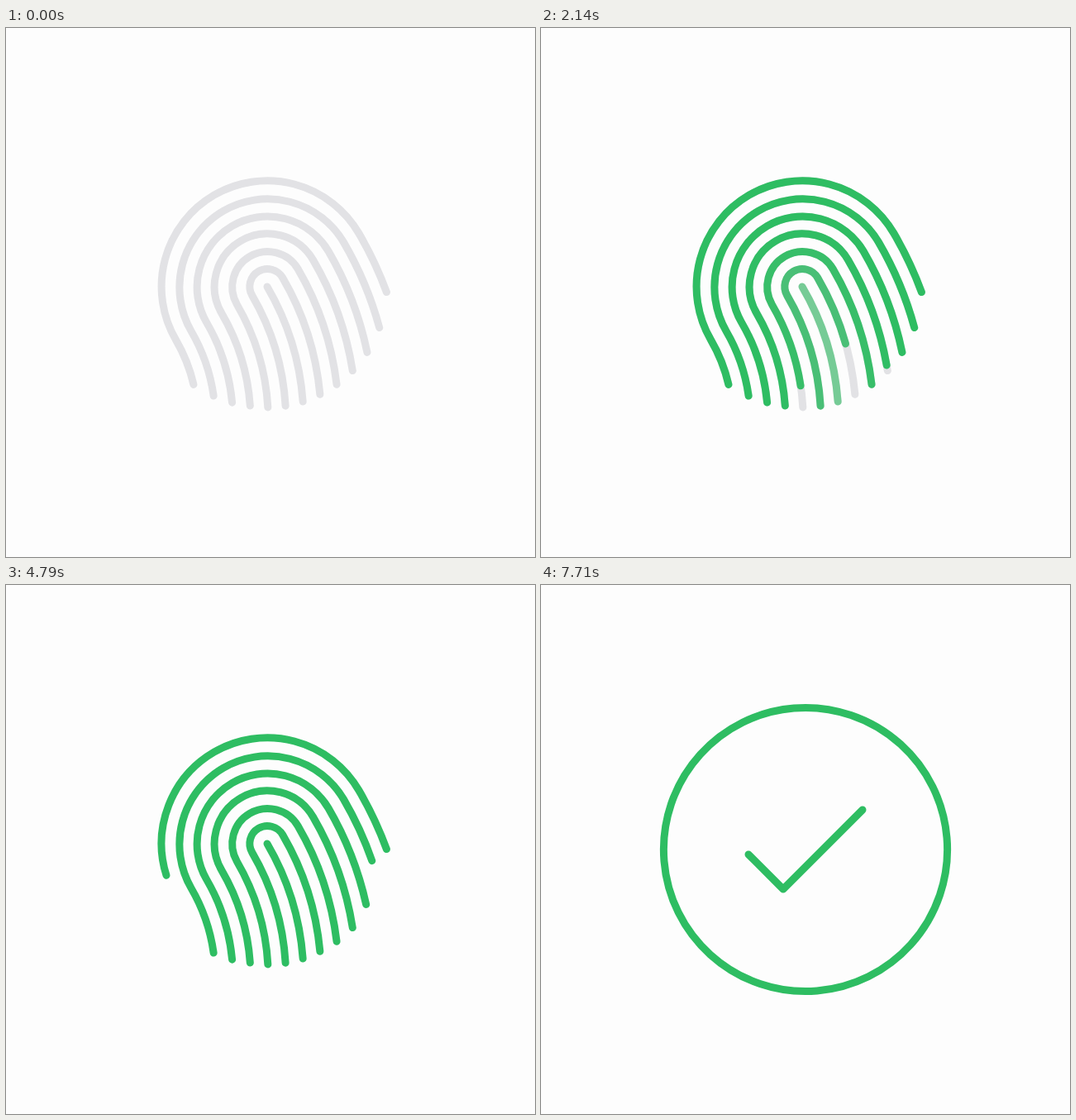
Recreate the animation shown at these times as an HTML page. Size 640 px wide and 640 px high, loop 8.43 s.

```html
<!DOCTYPE html>
<html lang="en">
<head>
<meta charset="utf-8">
<title>Fingerprint to check mark</title>
<style>
  html, body { margin: 0; width: 100%; height: 100%; overflow: hidden; background: #fdfdfd; }
  svg { display: block; width: 100%; height: 100%; }
  path { fill: none; stroke-width: 9; stroke-linecap: round; stroke-linejoin: round; }
</style>
</head>
<body>
<svg viewBox="0 0 640 640">
  <g id="base" stroke="#e2e2e5"></g>
  <g id="ink" stroke="rgb(46 189 98)"></g>
</svg>
<script>
const LOOP = 8430, MOVE = 1760, STAGGER = 200;
const ERASE_AT = 4190, BASE_OFF = 3490, RING_AT = 5030, CHECK_AT = 5740;
const GRAY = [200, 200, 210], GREEN = [46, 189, 98];

// Every ridge is a half circle around CORE, joined to arcs around PIVOT.
const CORE = [316, 313], PIVOT = [38, 475], REACH = 322, GAP = 21.35;
const AXIS = -30.23;

// End angles around PIVOT, outermost ridge first.
const RIDGES = [
  { left: -13.0, right: -20.2, from: 'left' },
  { left: -8.0, right: -15.2, from: 'right' },
  { left: -5.3, right: -11.7, from: 'right' },
  { left: -4.0, right: -9.0, from: 'left' },
  { left: -3.3, right: -6.9, from: 'right' },
  { left: -3.4, right: -5.3, from: 'left' }
];

const polar = ([cx, cy], r, deg) => {
  const a = deg * Math.PI / 180;
  return `${(cx + r * Math.cos(a)).toFixed(2)} ${(cy + r * Math.sin(a)).toFixed(2)}`;
};
const arc = (r, sweep, end) => `A${r} ${r} 0 0 ${sweep} ${end}`;
const mix = (from, to, p) => `rgb(${from.map((v, i) => Math.round(v + (to[i] - v) * p)).join(' ')})`;

function ridgePath({ left, right, from }, i) {
  const r = GAP * (RIDGES.length - i), inner = REACH - r, outer = REACH + r;
  const a = polar(PIVOT, inner, left), b = polar(PIVOT, inner, AXIS);
  const c = polar(PIVOT, outer, AXIS), d = polar(PIVOT, outer, right);
  return from === 'left'
    ? `M${a}${arc(inner, 0, b)}${arc(r, 1, c)}${arc(outer, 1, d)}`
    : `M${d}${arc(outer, 0, c)}${arc(r, 0, b)}${arc(inner, 1, a)}`;
}

function addPath(groupId, d) {
  const path = document.createElementNS('http://www.w3.org/2000/svg', 'path');
  path.setAttribute('d', d);
  path.setAttribute('pathLength', 1);
  return document.getElementById(groupId).appendChild(path);
}

const corePath = `M${CORE.join(' ')}${arc(REACH, 1, polar(PIVOT, REACH, -4.1))}`;
const ridgePaths = RIDGES.map(ridgePath);
[...ridgePaths, corePath].forEach(d => addPath('base', d));

const ridges = ridgePaths.map(d => addPath('ink', d));
const core = addPath('ink', corePath);
const ringPoint = deg => polar([320, 320], 171.6, deg);
const ring = addPath('ink', `M${ringPoint(-26.3)}${arc(171.6, 1, ringPoint(153.7))}${arc(171.6, 1, ringPoint(333.7))}`);
const check = addPath('ink', 'M251 326L293 368L389 272');
const base = document.getElementById('base');

// Symmetric cubic Bézier ease, solved by bisection.
function ease(x) {
  if (x <= 0) return 0;
  if (x >= 1) return 1;
  const k = 0.645;
  let lo = 0, hi = 1;
  for (let n = 0; n < 24; n++) {
    const s = (lo + hi) / 2, q = 1 - s;
    if (3 * k * s * q * q + 3 * (1 - k) * s * s * q + s ** 3 < x) lo = s; else hi = s;
  }
  return lo * lo * (3 - 2 * lo);
}
const progress = (t, start) => ease((t - start) / MOVE);

function trim(path, start, end) {
  const length = end - start;
  path.style.display = length < 0.003 ? 'none' : '';
  path.setAttribute('stroke-dasharray', `${length} 3`);
  path.setAttribute('stroke-dashoffset', -start);
}

function render(t) {
  base.style.display = t < BASE_OFF ? '' : 'none';
  ridges.forEach((path, i) => {
    const drawn = progress(t, i * STAGGER);
    trim(path, progress(t, ERASE_AT + i * STAGGER), drawn);
    path.setAttribute('stroke', mix(GRAY, GREEN, drawn));
  });
  const last = RIDGES.length * STAGGER;
  core.setAttribute('stroke-opacity', progress(t, last) - progress(t, ERASE_AT + last));
  trim(ring, 0, progress(t, RING_AT));
  trim(check, 0, progress(t, CHECK_AT));
}

const began = performance.now();
function tick() {
  render((performance.now() - began) % LOOP);
  requestAnimationFrame(tick);
}
tick();
</script>
</body>
</html>
```
